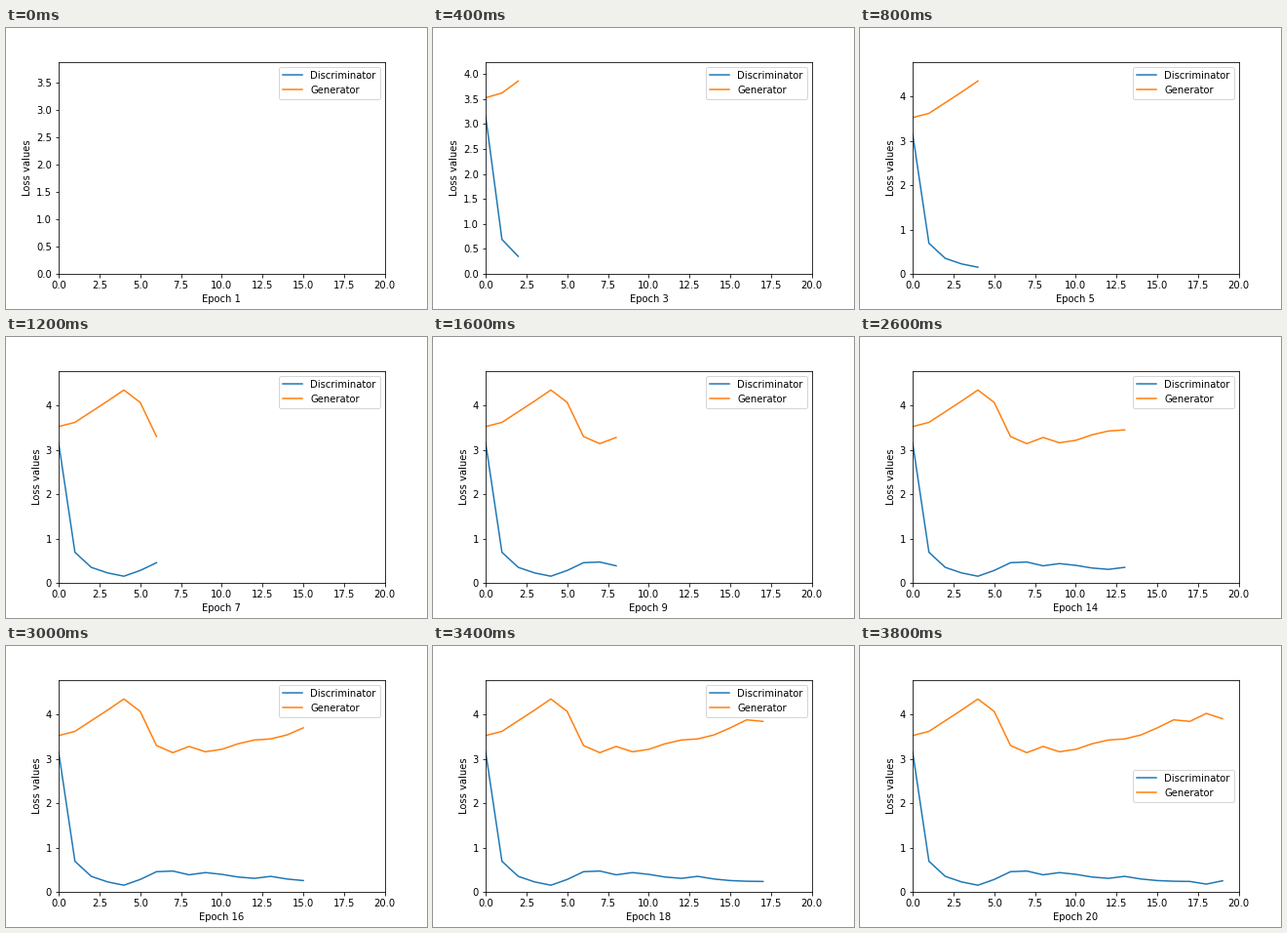
Write a matplotlib script that moves like this. It is 432 px wide and 288 px high and loops after 4000 ms.

```python
import matplotlib.pyplot as plt
from matplotlib.animation import FuncAnimation

EPOCHS = 20
STEP_MS = 200

disc_loss = [3.16, 0.69, 0.35, 0.225, 0.15, 0.28, 0.455, 0.47, 0.385, 0.435,
             0.395, 0.335, 0.305, 0.35, 0.29, 0.255, 0.24, 0.235, 0.175, 0.25]
gen_loss = [3.525, 3.62, 3.86, 4.10, 4.35, 4.07, 3.30, 3.14, 3.28, 3.16,
            3.215, 3.34, 3.425, 3.45, 3.54, 3.70, 3.88, 3.845, 4.025, 3.905]

plt.rcParams["font.family"] = "DejaVu Sans"
plt.rcParams["font.size"] = 10

fig, ax = plt.subplots(figsize=(6, 4), dpi=72)
fig.subplots_adjust(left=0.125, right=0.9, bottom=0.125, top=0.88)

disc_line, = ax.plot([], [], color="#1f77b4", label="Discriminator")
gen_line, = ax.plot([], [], color="#ff7f0e", label="Generator")
ax.set_xlim(0, EPOCHS)
ax.set_ylabel("Loss values")
ax.legend(loc="best")


def update(epoch):
    n = epoch + 1
    disc_line.set_data(range(n), disc_loss[:n])
    gen_line.set_data(range(n), gen_loss[:n])
    # Keep 10% headroom above the highest loss so far
    ax.set_ylim(0, 1.1 * max(disc_loss[:n] + gen_loss[:n]))
    ax.set_xlabel(f"Epoch {n}")
    return disc_line, gen_line


anim = FuncAnimation(fig, update, frames=EPOCHS, interval=STEP_MS,
                     repeat=True, repeat_delay=0, blit=False)
plt.show()
```
